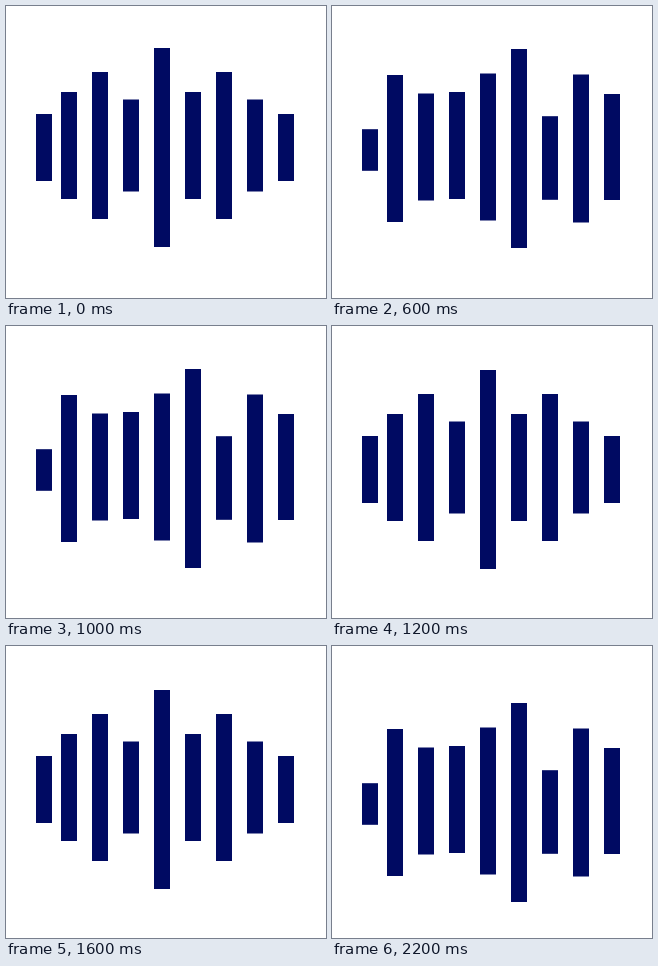
An HTML page for the animation above (2400 ms loop, 320x292 px).

```html
<!DOCTYPE html>
<html lang="en">
<head>
<meta charset="utf-8">
<title>Sound bars</title>
<style>
  html, body { margin: 0; width: 100%; height: 100%; overflow: hidden; background: #fff; }
  svg { display: block; width: 100%; height: 100%; }
</style>
</head>
<body>
<svg viewBox="0 0 320 292">
  <g id="bars" fill="#000a62"></g>
</svg>
<script>
const STEP = 200;
const STEPS = 12;
const COUNT = 9;
const WIDTH = 16;
const SPACING = 31;
const PEAK = 199;

// Heights repeat every four bars, with one peak in the middle
const calm = i => ({
  height: i === 4 ? PEAK : [67, 107, 147, 92][i % 4],
  centre: i % 4 ? 139.5 : 141.5
});

// Centres follow a zigzag, with one bar hanging lower
const livelyHeights = [41.6, 147, 107, 107, 147, PEAK, 83.6, 148, 106];
const lively = i => ({
  height: livelyHeights[i],
  centre: 137.5 + 1.5 * Math.abs(3 - i % 6) + 8 * Math.max(0, 1 - Math.abs(i - 6))
});

const group = document.getElementById('bars');
const bars = Array.from({ length: COUNT }, (_, i) => {
  const bar = document.createElementNS('http://www.w3.org/2000/svg', 'rect');
  bar.setAttribute('x', Math.max(30, 24 + SPACING * i));
  bar.setAttribute('width', WIDTH);
  return group.appendChild(bar);
});

// The row settles by 2px, then drops on every fourth step
function dropAt(step) {
  return step > 4 && step % 4 === 3 ? 16 : Math.min(step, 1) * 2;
}

function draw(time) {
  const step = Math.floor(time / STEP) % STEPS;
  const pose = step % 2 ? lively : calm;
  group.setAttribute('transform', `translate(0 ${dropAt(step)})`);
  bars.forEach((bar, i) => {
    const { height, centre } = pose(i);
    bar.setAttribute('y', centre - height / 2);
    bar.setAttribute('height', height);
  });
}

const start = performance.now();
function tick() {
  draw(performance.now() - start);
  requestAnimationFrame(tick);
}
tick();
</script>
</body>
</html>
```
